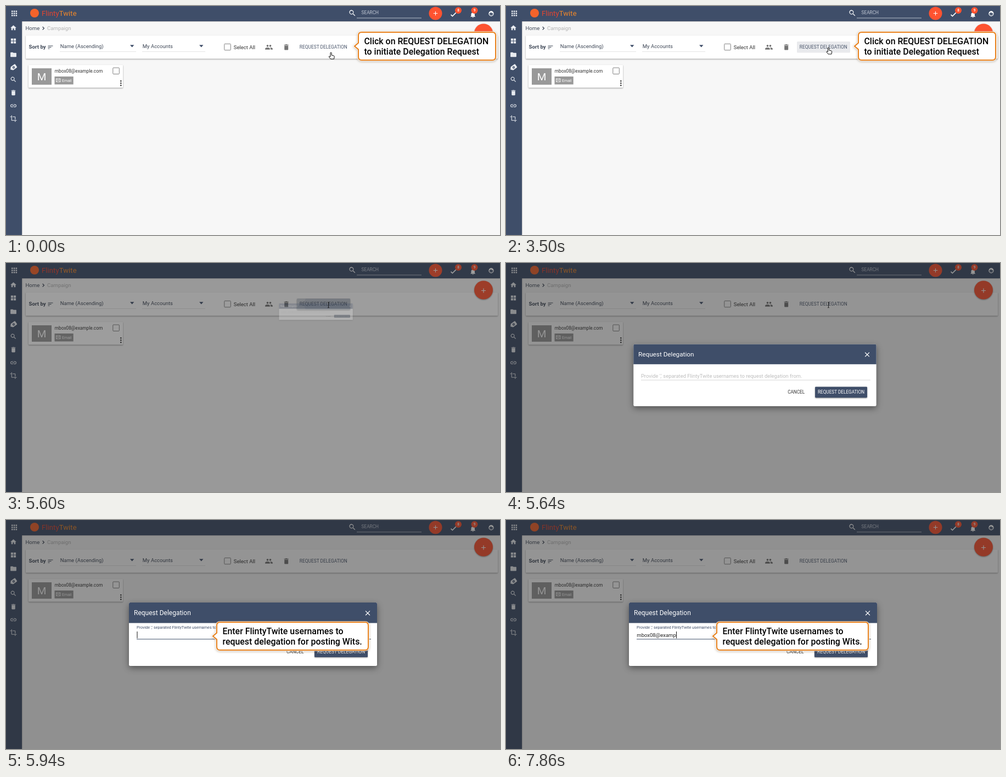
These frames come from a looping animation (900x419 px, 8000 ms). An HTML page:

```html
<!DOCTYPE html>
<html lang="en">
<head>
<meta charset="utf-8">
<title>Delegation request walkthrough</title>
<style>
  html, body { margin: 0; width: 100%; height: 100%; overflow: hidden; background: #f7f7f7; }
  svg { display: block; width: 900px; height: 419px; }
  text { font-family: Roboto, Arial, sans-serif; white-space: pre; }
  .frame { filter: drop-shadow(0 0 .8px rgba(0,0,0,.45)); }
  .raised { filter: drop-shadow(0 1px 1.2px rgba(0,0,0,.38)); }
  .deep { filter: drop-shadow(0 4px 6px rgba(0,0,0,.42)); }
  .tip { filter: drop-shadow(0 1px 2px rgba(90,50,0,.35)); }
</style>
</head>
<body>
<svg id="stage" viewBox="0 0 900 419" xmlns="http://www.w3.org/2000/svg"></svg>
<script>
const LOOP = 8000;
const NAVY = '#3f4e69', ORANGE = '#ff5330', PALE = '#e9ecf1', INK = '#3f4857', GREY = '#999';

const PATHS = {
  home: 'M10 20v-6h4v6h5v-8h3L12 3 2 12h3v8z',
  tiles: 'M2 2h9v9H2zM13 2h9v9h-9zM2 13h9v9H2zM13 13h9v9h-9z',
  folder: 'M10 4H4c-1.1 0-2 .9-2 2v12c0 1.1.9 2 2 2h16c1.1 0 2-.9 2-2V8c0-1.1-.9-2-2-2h-8z',
  tag: 'M0 12L6 5h15q2 0 2 2v10q0 2-2 2H6zM13 8a4 4 0 1 0 0 8 4 4 0 0 0 0-8zm0 2.500a1.500 1.500 0 1 1 0 3 1.500 1.500 0 0 1 0-3z',
  search: 'M15.5 14h-.8l-.3-.3A6.5 6.5 0 1 0 13.7 14.4l.3.3v.8l5 5 1.5-1.5zm-6 0a4.5 4.5 0 1 1 0-9 4.5 4.5 0 0 1 0 9z',
  trash: 'M6 19c0 1.1.9 2 2 2h8c1.1 0 2-.9 2-2V7H6zM19 4h-3.5l-1-1h-5l-1 1H5v2h14z',
  link: 'M3.9 12c0-1.7 1.4-3.1 3.1-3.1h4V7H7a5 5 0 0 0 0 10h4v-1.9H7A3.1 3.1 0 0 1 3.9 12zM8 13h8v-2H8zm9-6h-4v1.9h4a3.1 3.1 0 0 1 0 6.2h-4V17h4a5 5 0 0 0 0-10z',
  crop: 'M17 15h2V7c0-1.1-.9-2-2-2H9v2h8zM7 17V1H5v4H1v2h4v10c0 1.1.9 2 2 2h10v4h2v-4h4v-2z',
  sort: 'M3 18h6v-2H3zM3 6v2h18V6zm0 7h12v-2H3z',
  people: 'M16 11a3 3 0 1 0 0-6 3 3 0 0 0 0 6zm-8 0a3 3 0 1 0 0-6 3 3 0 0 0 0 6zm0 2c-2.3 0-7 1.2-7 3.5V19h14v-2.5c0-2.3-4.7-3.5-7-3.5zm8 0l-1 .1c1.2.8 2 1.9 2 3.4V19h6v-2.5c0-2.3-4.7-3.5-7-3.5z',
  check: 'M9 15.5L5 11.5 2.7 13.7 9 20 22 7l-2.3-2.3z',
  bell: 'M12 22a2 2 0 0 0 2-2h-4c0 1.1.9 2 2 2zm6-6v-5c0-3.1-1.6-5.6-4.5-6.3V4a1.5 1.5 0 0 0-3 0v.7C7.6 5.4 6 7.9 6 11v5l-2 2v1h16v-1z',
  chevron: 'M10 5L8 7l5 5-5 5 2 2 7-7z',
  close: 'M19 6.4L17.6 5 12 10.6 6.4 5 5 6.4 10.6 12 5 17.6 6.4 19 12 13.4 17.6 19 19 17.6 13.4 12z',
  plus: 'M19 13h-6v6h-2v-6H5v-2h6V5h2v6h6z'
};

const icon = (name, cx, cy, size, fill = PALE, turn = 0) =>
  `<path d="${PATHS[name]}" fill="${fill}" transform="translate(${cx} ${cy}) rotate(${turn}) scale(${size / 24}) translate(-12 -12)"/>`;
const text = (s, x, y, size, fill, extra = '') =>
  `<text x="${x}" y="${y}" font-size="${size}" fill="${fill}" ${extra}>${s}</text>`;
const rect = (x, y, w, h, fill, extra = '') =>
  `<rect x="${x}" y="${y}" width="${w}" height="${h}" fill="${fill}" ${extra}/>`;
const disc = (x, y, r, fill, extra = '') =>
  `<circle cx="${x}" cy="${y}" r="${r}" fill="${fill}" ${extra}/>`;
const checkbox = (x, y) => rect(x, y, 11.5, 11.5, '#fff', 'rx="1" stroke="#808080"');
const arrow = (x, y) => `<path d="M${x - 3.7} ${y - 2}h7.4l-3.7 4.3z" fill="${NAVY}"/>`;
const badge = (x, y, n) => disc(x, y, 6, ORANGE) +
  text(n, x, y + 2.4, 6.5, '#fff', 'text-anchor="middle" font-weight="500"');
const MID = 'text-anchor="middle"';

// Callout box with a tail on its left edge.
function callout(id, x, y, w, h, lines) {
  const r = 6, m = y + h / 2;
  const d = `M${x + r} ${y}h${w - 2 * r}q${r} 0 ${r} ${r}v${h - 2 * r}q0 ${r} ${-r} ${r}h${2 * r - w}` +
    `q${-r} 0 ${-r} ${-r}V${m + 6}L${x - 7} ${m}L${x} ${m - 6}V${y + r}q0 ${-r} ${r} ${-r}z`;
  return `<g id="${id}"><g class="tip"><path d="${d}" fill="#fff" stroke="#fff" stroke-opacity=".75" stroke-width="4"/>` +
    `<path d="${d}" fill="#fff" stroke="#e8811c" stroke-width="2"/></g>` +
    lines.map((s, i) => text(s, x + 10.5, y + 21.7 + i * 19.5, 15.9, '#000', 'font-weight="500"')).join('') + '</g>';
}

function header() {
  let dots = '';
  for (let i = 0; i < 9; i++) dots += rect(10 + i % 3 * 3.8, 8.5 + Math.floor(i / 3) * 3.8, 2.5, 2.5, PALE);
  return `<path class="frame" d="M0 0h900v28H29v391H0z" fill="${NAVY}"/>` + dots +
    disc(52, 13, 8, '#f5632b') +
    '<text x="65" y="17.5" font-size="13" letter-spacing=".1" fill="#e8452f">Flinty<tspan fill="#f0872a">Twite</tspan></text>' +
    icon('search', 631, 13, 15, '#fff') + text('SEARCH', 647.5, 15.3, 8.3, '#c3cad6') +
    rect(639, 21.5, 118, 1, '#b5bdca') +
    disc(782.5, 13.5, 12, ORANGE) + icon('plus', 782.5, 13.5, 13, '#fff') +
    icon('check', 815, 15.5, 13, '#fff') + badge(824, 8, 8) +
    icon('bell', 850.7, 16, 13, '#fff') + badge(853.5, 8, 9) +
    disc(884, 14, 4, 'none', 'stroke="#fff" stroke-width="1.3"') +
    '<path d="M880 13.5a4 4 0 0 1 8 0q-3 0-4.500-2-1 1.700-3.500 2z" fill="#fff"/>' +
    disc(882.5, 15, .6, '#fff') + disc(885.5, 15, .6, '#fff');
}

function sidebar() {
  const items = ['home', 'tiles', 'folder', 'tag', 'search', 'trash', 'link', 'crop'];
  const rows = [40, 64, 89, 112.5, 134.5, 158.5, 182.5, 206];
  return items.map((n, i) => icon(n, 13.5, rows[i], n === 'tiles' ? 11 : 13, PALE, n === 'tag' ? -35 : 0)).join('');
}

function page() {
  return rect(0, 0, 900, 419, '#f7f7f7') + header() + sidebar() +
    text('Home', 35.5, 43.6, 9.6, INK) + icon('chevron', 68, 40.8, 11, INK) +
    text('Campaign', 75, 43.6, 9.6, '#b2b2b2') +
    rect(36, 54, 860, 42.5, '#fff', 'class="raised" rx="1"') +
    text('Sort by', 41.5, 78.4, 9.7, INK, 'font-weight="700"') + icon('sort', 81, 75.5, 12, INK) +
    text('Name (Ascending)', 98.8, 76.5, 9.5, INK) + arrow(229.7, 73.3) + rect(98, 83, 139, .8, '#dedede') +
    text('My Accounts', 248.8, 76.5, 9.5, INK) + arrow(355.8, 73.3) + rect(248, 83, 115, .8, '#dedede') +
    checkbox(397.8, 69.3) + text('Select All', 414.8, 79, 9.5, '#333') +
    icon('people', 479, 75.3, 15, '#757575') + icon('trash', 510.7, 75.3, 14, '#757575') +
    rect(530, 65, 97, 20.5, '#e9eaed', 'id="hover" rx="1.5"') +
    '<g id="press">' + rect(530, 65, 97, 20.5, '#c9ced5', 'rx="1.5" class="raised"') +
    '<path d="M546 65h79.5q1.5 0 1.5 1.5v17.5q0 1.5-1.5 1.5H546q-6-10 0-20.500z" fill="#b9c0ca"/></g>' +
    text('REQUEST DELEGATION', 578.3, 77.7, 8.4, '#4a566b', MID) +
    rect(41, 108, 172, 41.5, '#fff', 'class="raised" rx="1"') +
    rect(47, 114, 36, 30, GREY) + text('M', 65, 136.2, 19, '#fff', MID) +
    text('mbox08@example.com', 88.8, 122, 8.3, '#333') + checkbox(194.8, 113) +
    rect(88.5, 129, 34.2, 14.5, GREY) +
    '<path d="M91.5 133h7.5v5.8h-7.5zl3.7 3 3.8-3M91.5 138.8l2.7-3M99 138.8l-2.7-3" fill="none" stroke="#fff" stroke-width=".8"/>' +
    text('Email', 102, 138.7, 7.1, '#fff') +
    [137.3, 141.3, 145.3].map(y => disc(209.3, y, 1.3, '#333')).join('') +
    disc(870, 49.5, 17, ORANGE, 'class="raised"') + icon('plus', 870, 50.5, 14, '#fff');
}

function dialog() {
  return '<g id="dialog"><g class="deep">' + rect(224, 151, 452, 116, '#fff', 'rx="2.5"') + '</g>' +
    `<path d="M224 188.5v-35q0-2.5 2.5-2.5h447q2.5 0 2.5 2.5v35z" fill="${NAVY}"/>` +
    text('Request Delegation', 233, 174.3, 12, '#fff') + icon('close', 659, 170.3, 15, '#fff') +
    '<text id="label" font-size="9.6">Provide \',\' separated FlintyTwite usernames to request delegation from.</text>' +
    rect(238, 217.5, 427, 1, '#d5d5d5', 'id="line"') +
    text('', 238.3, 214, 9.5, '#222', 'id="typed"') + rect(238.5, 204, 1, 12.5, '#111', 'id="caret"') +
    text('CANCEL', 526.8, 243.5, 8.4, '#333', MID) +
    rect(562, 230.5, 97, 20.5, NAVY, 'rx="1.5" class="raised"') +
    text('REQUEST DELEGATION', 610.5, 243.5, 8.4, '#fff', MID) + '</g>';
}

const hand = '<path id="hand" d="M-2-5.5q1.3-1.2 2.2.2V-1l3.6.8q1.6.5 1.4 2L4.5 6h-6L-4.8 1.8q.5-1.7 2.8 0z" fill="#fff" stroke="#111" stroke-width="1"/>';
const beam = '<path id="beam" d="M586 71.5q1.5 0 1.5 1.5 0-1.5 1.5-1.5M587.5 72.5v8.5M586 82q1.5 0 1.5-1.5 0 1.5 1.5 1.5" fill="none" stroke="#111" stroke-width=".8"/>';

const stage = document.getElementById('stage');
stage.innerHTML = page() + rect(0, 0, 900, 419, '#212121', 'id="shade"') + dialog() +
  callout('tipStart', 642, 48, 250, 51, ['Click on REQUEST DELEGATION', 'to initiate Delegation Request']) +
  callout('tipEnter', 384, 187, 276, 51, ['Enter FlintyTwite usernames to', 'request delegation for posting Wits.']) +
  hand + beam;

const el = {};
stage.querySelectorAll('[id]').forEach(n => el[n.id] = n);

const OPEN = 5600, FLOAT = 5660, TIP = 5940;
const ENTRY = 'mbox08@examp';
const KEYS = [[6420, 1], [6500, 2], [6580, 3], [6660, 4], [6740, 5], [6820, 6], [7060, 7], [7260, 8], [7460, 10], [7860, 12]];
const GROW = [.105, .75, .973, 1];

const show = (node, on) => { node.style.display = on ? '' : 'none'; };
const mix = (a, b, p) => a + (b - a) * p;

function render(t) {
  const open = t >= OPEN;
  const step = Math.floor((t - OPEN) / 20);
  show(el.hover, t >= 3500 && t < 4900);
  show(el.press, t >= 4900 && t < OPEN + 20);
  show(el.tipStart, !open);
  show(el.tipEnter, t >= TIP);
  show(el.hand, !open);
  show(el.beam, open && t < 5800);
  show(el.shade, open);
  show(el.dialog, open);
  el.hand.setAttribute('transform', t < 3500 ? 'translate(593 91)' : 'translate(588.5 82)');
  if (!open) return;

  // The dialog grows out of the toolbar button.
  const p = GROW[Math.min(step, GROW.length - 1)];
  el.shade.setAttribute('opacity', step ? .48 : .44);
  el.dialog.setAttribute('opacity', step ? 1 : .24);
  el.dialog.setAttribute('transform',
    `translate(${mix(578, 450, p)} ${mix(75, 209, p)}) scale(${mix(.215, 1, p)} ${mix(.172, 1, p)}) translate(-450 -209)`);

  const f = Math.max(0, Math.min(1, (t - FLOAT) / 80));
  el.label.setAttribute('transform', `translate(238 ${mix(214, 199.4, f)}) scale(${mix(1, .75, f)})`);
  el.label.setAttribute('fill', f > 0 ? NAVY : '#bdbdbd');
  el.line.setAttribute('fill', f > 0 ? NAVY : '#d5d5d5');

  const count = KEYS.reduce((n, [at, len]) => t >= at ? len : n, 0);
  el.typed.textContent = ENTRY.slice(0, count);
  el.caret.setAttribute('x', 238.5 + (count ? el.typed.getComputedTextLength() : 0));
  show(el.caret, count > 0 || t >= 5700 && Math.floor((t - 5700) / 100) % 2 === 0);
}

const start = performance.now();
function tick() {
  const t = (performance.now() - start) % LOOP;
  render(Math.floor(t / 20) * 20);
  requestAnimationFrame(tick);
}
render(0);
requestAnimationFrame(tick);
</script>
</body>
</html>
```
